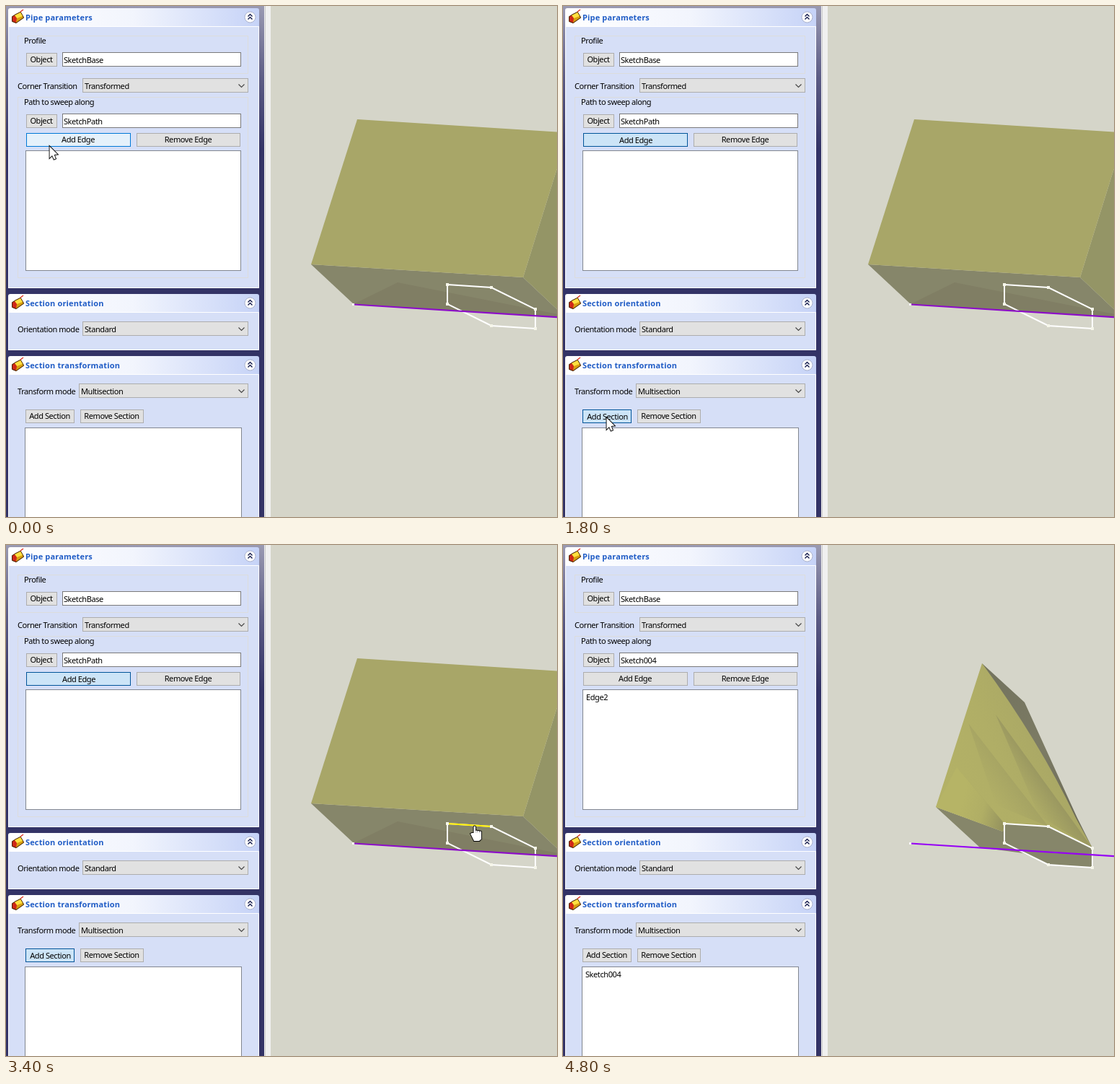
Write an HTML page with a canvas that moves like this. It is 764 px wide and 708 px high and loops after 6.07 s.

```html
<!DOCTYPE html>
<html lang="en">
<head>
<meta charset="utf-8">
<title>Pipe parameters</title>
<style>
  html, body { margin: 0; width: 100%; height: 100%; overflow: hidden; background: #d5d5c9; }
  canvas { display: block; }
</style>
</head>
<body>
<canvas id="stage" width="764" height="708"></canvas>
<script>
const ctx = document.getElementById('stage').getContext('2d', { alpha: false });
const LOOP = 6070, STEP = 1000 / 15;

// eased pointer moves: first step, last step, end point
const MOVES = [
  [0, 2, 69, 187], [4, 12, 69, 553], [12, 13, 82, 560], [14, 17, 60, 570],
  [27, 34, 579, 363], [34, 41, 660, 395], [43, 47, 655, 388], [47, 51, 650, 389],
  [62, 66, 143, 530], [66, 72, 120, 712]
];

function pointerAt(k) {
  let x = 60, y = 194;
  for (const [from, to, x1, y1] of MOVES) {
    const u = Math.min(1, Math.max(0, (k - from) / (to - from)));
    const ease = u * u * (3 - 2 * u);
    x += (x1 - x) * ease;
    y += (y1 - y) * ease;
  }
  return [Math.round(x), Math.round(y)];
}

function gradient(x0, y0, x1, y1, ...colors) {
  const g = ctx.createLinearGradient(x0, y0, x1, y1);
  colors.forEach((c, i) => g.addColorStop(i / (colors.length - 1), c));
  return g;
}

function trace(pts, close = true) {
  ctx.beginPath();
  for (const [x, y] of pts) ctx.lineTo(x, y);
  if (close) ctx.closePath();
}

function poly(color, ...pts) {
  trace(pts);
  ctx.fillStyle = color;
  ctx.fill();
}

function line(color, width, ...pts) {
  trace(pts, false);
  ctx.strokeStyle = color;
  ctx.lineWidth = width;
  ctx.stroke();
}

function rect(color, x, y, w, h) {
  ctx.fillStyle = color;
  ctx.fillRect(x, y, w, h);
}

function frame(x, y, w, h, fill, border) {
  rect(border, x, y, w, h);
  rect(fill, x + 1, y + 1, w - 2, h - 2);
}

function text(str, x, y, { color = '#000', bold = false, align = 'left' } = {}) {
  ctx.font = (bold ? 'bold ' : '') + '11px "Noto Sans", "Open Sans", sans-serif';
  ctx.letterSpacing = bold ? '0.15px' : '-0.42px';
  ctx.textAlign = align;
  ctx.fillStyle = color;
  ctx.fillText(str, x, y);
}

// Panel

const LOOKS = {
  normal: ['#e1e1e1', '#adadad'],
  hover: ['#e5f1fb', '#0078d7'],
  pressed: ['#cce4f7', '#005499']
};

function button(label, x, y, w, look = 'normal') {
  const shift = look === 'pressed' ? 1 : 0;
  frame(x, y, w, 19, ...LOOKS[look]);
  text(label, x + w / 2 - 0.5 + shift, y + 13 + shift, { align: 'center' });
}

function field(value, y) {
  frame(78, y, 248, 20, '#fff', '#7a7a7a');
  text(value, 80, y + 15);
}

function list(item, x, y, w, h) {
  frame(x, y, w, h, '#fff', '#828790');
  text(item, x + 5, y + 15);
}

function chevron(color, width, x, y, size) {
  line(color, width, [x - Math.abs(size), y - size], [x, y], [x + Math.abs(size), y - size]);
}

function combo(label, value, x, y) {
  text(label, 16, y + 15);
  frame(x, y, 336 - x, 20, ...LOOKS.normal);
  text(value, x + 3, y + 15);
  chevron('#444', 1.1, 326.5, y + 12.5, 4);
}

function group(label, y, h) {
  ctx.strokeStyle = '#dcdcdc';
  ctx.lineWidth = 1;
  ctx.strokeRect(16.5, y + 0.5, 319, h);
  text(label, 25, y + 11);
}

function icon(y) {
  ctx.lineJoin = 'round';
  line('#4a2400', 2, [12, y + 9], [20, y + 5], [24, y + 12], [14, y + 19], [9, y + 17], [9, y + 11], [12, y + 9]);
  poly('#d8a010', [12, y + 9], [20, y + 5], [24, y + 12], [14, y + 19]);
  poly('#ffe040', [12, y + 9], [20, y + 5], [23, y + 10], [15, y + 13]);
  poly('#d02818', [9, y + 11], [12, y + 9], [15, y + 13], [14, y + 19], [9, y + 17]);
  line('#e03020', 1.4, [20, y + 4], [24, y + 1]);
  ctx.lineJoin = 'miter';
}

function section(title, y, h, [px, py]) {
  const hover = px < 350 && py >= y && py < y + 25;
  ctx.beginPath();
  ctx.roundRect(3, y, 348, 25, [3, 3, 0, 0]);
  ctx.fillStyle = gradient(3, 0, 350, 0, '#fff', '#f2f5fd', '#c6d3f7');
  ctx.fill();
  frame(3, y + 25, 348, h - 25, '#d6dff7', '#fff');
  icon(y + 1);
  text(title, 27, y + 17, { bold: true, color: hover ? '#428eeb' : '#215dc6' });
  ctx.beginPath();
  ctx.arc(338.5, y + 12.5, 7.5, 0, 2 * Math.PI);
  ctx.fillStyle = '#fff';
  ctx.fill();
  ctx.strokeStyle = '#a9b1cc';
  ctx.lineWidth = 1;
  ctx.stroke();
  for (const dy of [8.5, 12.5]) chevron('#10184a', 1.4, 338.5, y + dy, -3);
}

function panel(k, done) {
  const last = pointerAt(k - 1); // headers light up one step late
  const pick = (hoverFrom, pressFrom) =>
    done || k < hoverFrom ? 'normal' : k < pressFrom ? 'hover' : 'pressed';

  rect(gradient(0, 0, 0, 200, '#9a9ab2', '#5c5c85', '#333366'), 0, 0, 358, 708);
  rect('#f0f0f0', 358, 0, 9, 708);
  rect('#c8c8c8', 359, 0, 1, 708);

  section('Pipe parameters', 3, 388, last);
  group('Profile', 41, 52);
  button('Object', 28, 65, 43);
  field('SketchBase', 64);
  combo('Corner Transition', 'Transformed', 106, 100);
  group('Path to sweep along', 126, 250);
  button('Object', 28, 150, 43);
  field(done ? 'Sketch004' : 'SketchPath', 149);
  button('Add Edge', 28, 176, 145, pick(0, 4));
  button('Remove Edge', 181, 176, 144);
  list(done ? 'Edge2' : '', 27, 200, 299, 167);

  section('Section orientation', 399, 78, last);
  combo('Orientation mode', 'Standard', 106, 437);

  section('Section transformation', 485, 240, last);
  combo('Transform mode', 'Multisection', 101, 523);
  button('Add Section', 27, 559, 68, pick(13, 21));
  button('Remove Section', 103, 559, 88);
  list(done ? 'Sketch004' : '', 26, 584, 301, 140);
}

// 3D view

function block() {
  const left = [423, 358], corner = [717, 376], base = [482, 413];
  const top = [770, 206], right = [770, 426], end = [770, 432];
  poly('#86866a', left, corner, right, end, base);
  poly('#807e64', base, [543, 383], [770, 428], end);
  poly('#949566', top, corner, right);
  poly('#a8a668', [487, 157], [770, 175], top, corner, left);
}

const RING = [[612, 386], [673, 390], [734, 420], [734, 447], [673, 443], [612, 413]];

// shade that deepens from a ridge towards its far side
function fold(tip, foot, side, alpha) {
  const dx = foot[0] - tip[0], dy = foot[1] - tip[1];
  const d = (dx * (side[1] - tip[1]) - dy * (side[0] - tip[0])) / (dx * dx + dy * dy);
  const from = [side[0] + dy * d, side[1] - dx * d];
  const shade = gradient(...side, ...from, 'rgba(115,112,85,0)', `rgba(115,112,85,${alpha})`);
  poly(shade, tip, foot, side);
}

function loft() {
  const apex = [581, 164], left = [517, 363], foot = [610, 397];
  const [a, b, c] = RING;
  poly('#86866a', left, foot, ...RING.slice(0, 5), [638, 427], [578, 419]);
  poly(gradient(600, 190, 712, 380, '#74745f', '#7c7b64', '#6b6a58'), apex, [640, 218], [713, 378], c, b);

  trace([b, a, foot, left, apex], false);
  ctx.quadraticCurveTo(660, 271, 711, 378);
  ctx.lineTo(...c);
  ctx.fillStyle = gradient(530, 330, 680, 270, '#b3b166', '#b0ae66', '#a9a765');
  ctx.fill();

  fold([562, 247], b, [600, 360], 0.15);
  fold([600, 235], c, [660, 375], 0.3);
  fold([546, 308], a, foot, 0.15);
  poly(gradient(550, 370, 610, 385, '#b6b466', '#b0ae65', '#96945f'), [546, 308], left, foot, a);
}

function sketch(edgeLit, pathLit, done) {
  trace(RING);
  ctx.strokeStyle = '#fff';
  ctx.lineWidth = 2;
  ctx.stroke();
  if (edgeLit) line('#ffee00', 2, RING[0], RING[1]);
  line(pathLit ? '#ffee00' : done ? '#9600f5' : '#8c0cc8', 2, [482, 413.5], [770, 431.5]);
  for (const [x, y] of RING) rect('#f6f6ea', x - 2, y - 2, 4, 4);
  rect('#fff', 480, 412, 3, 3);
}

// Pointer

function arrow() {
  trace([[0.5, 0.5], [0.5, 16.5], [4, 13], [6.5, 18.5], [9, 17.5], [6.7, 12], [11.5, 11.5]]);
}

function hand() {
  trace([[-6, 11], [-4, 10], [8.5, 10], [8.5, 15], [6.5, 21], [-1, 21]]);
  for (let i = 0; i < 4; i++) ctx.roundRect(-1.5 + i * 2.7, i ? 6 + i / 2 : 0.5, 2.5, 12, 1.2);
}

function pointer(k, onEdge) {
  ctx.save();
  ctx.translate(...pointerAt(k));
  (onEdge ? hand : arrow)();
  ctx.strokeStyle = '#000';
  ctx.lineWidth = 1.8;
  ctx.stroke();
  ctx.fillStyle = '#fff';
  ctx.fill();
  ctx.restore();
}

const start = performance.now();

function draw() {
  const now = (performance.now() - start) % LOOP;
  const k = Math.floor((now + 4) / STEP) % 91;
  const done = k >= 53, onEdge = k >= 43 && k < 63;
  rect('#d5d5c9', 0, 0, 764, 708);
  (done ? loft : block)();
  sketch(onEdge, k === 32, done);
  panel(k, done);
  if (k < 72) pointer(k, onEdge);
  requestAnimationFrame(draw);
}
draw();
</script>
</body>
</html>
```
